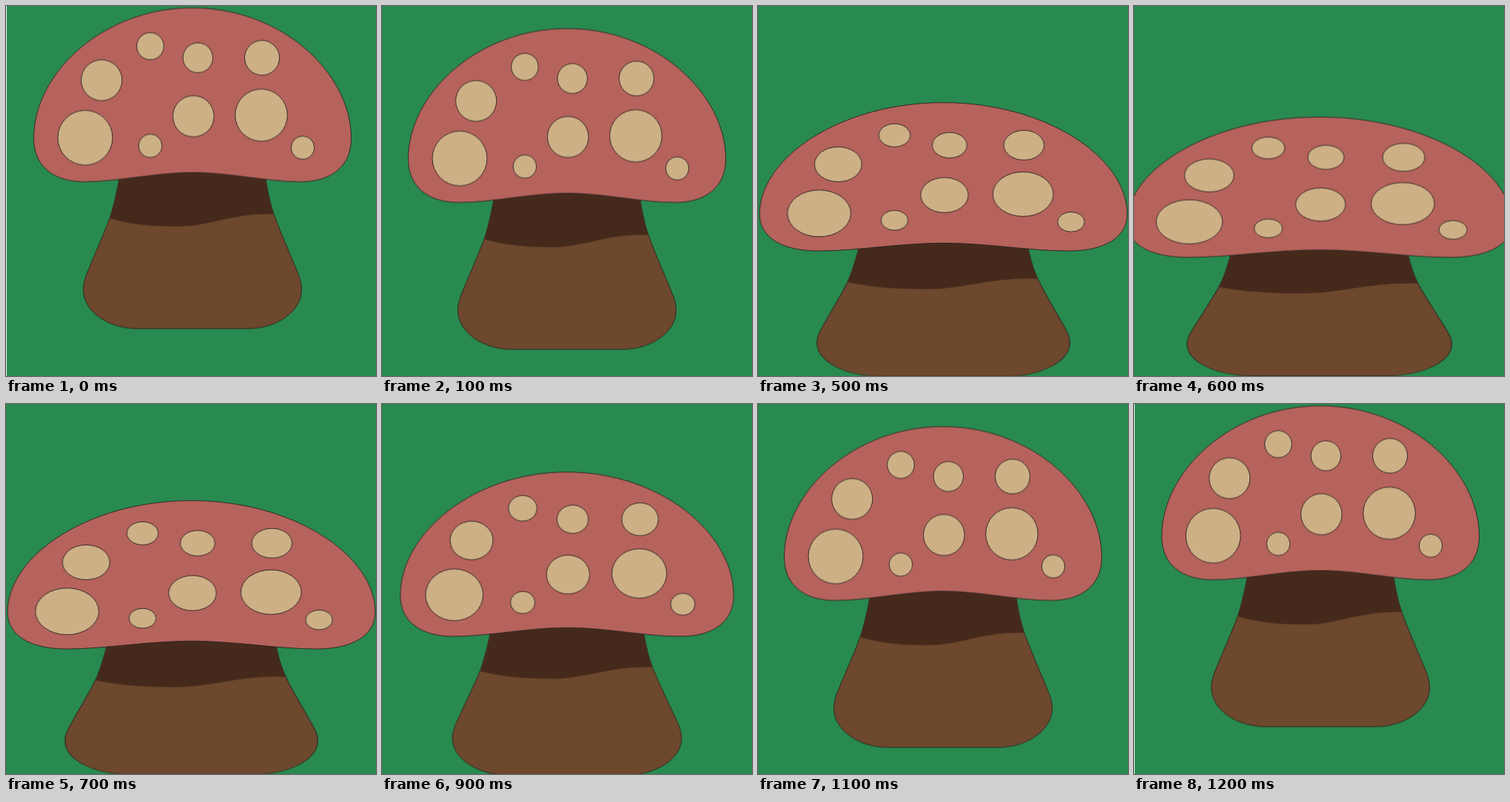
An HTML page that plays this animation: 500 px wide and 500 px high, repeating every 1.3 s.

```html
<!DOCTYPE html>
<html lang="en">
<head>
<meta charset="utf-8">
<title>Bouncing mushroom</title>
<style>
  html, body { margin: 0; width: 100%; height: 100%; overflow: hidden; background: #298a50; }
  svg { display: block; width: 100vw; height: 100vh; }
  .ink { stroke: #2b2220; stroke-width: .9; }
  .ink * { vector-effect: non-scaling-stroke; }
  .body { animation: bounce 1.3s step-end infinite; }
  .edge { animation: edge 1.3s step-end infinite; }

  /* Drop, squash against the floor, then the same way back. */
  @keyframes bounce {
    0%, 92.3%      { transform: translate(252px, 2.5px); }
    7.69%, 84.61%  { transform: translate(250px, 30.5px); }
    15.38%, 76.92% { transform: translate(250px, 64px); }
    23.07%, 69.23% { transform: translate(250px, 92px) scale(1.05, .945); }
    30.76%, 61.53% { transform: translate(250px, 111px) scale(1.104, .899); }
    38.46%, 53.84% { transform: translate(250.5px, 130.5px) scale(1.158, .853); }
    46.15%         { transform: translate(250.5px, 150px) scale(1.212, .807); }
  }
  @keyframes edge {
    0%, 92.3% { opacity: 1; }
    7.69% { opacity: 0; }
  }
</style>
</head>
<body>
<svg viewBox="0 0 500 500">
  <defs>
    <path id="stem" d="M151 250 V262 C146 288 141 307 138 315 C130 337 114 372 106 393 C103.5 400 102.5 406 102.5 411 C102.5 442 138 464 175 464
      H325 C362 464 397.5 442 397.5 411 C397.5 406 396.5 400 394 393 C386 372 370 337 361 312 C358 304 353 288 349 262 V250 Z"/>
    <clipPath id="inStem"><use href="#stem"/></clipPath>
  </defs>
  <rect class="edge" width="1" height="500" fill="#e9f3ed"/>
  <g class="body">
    <g class="ink" transform="translate(-250 -30.5)">
      <use href="#stem" fill="#6d482d"/>
      <path clip-path="url(#inStem)" stroke="none" fill="#452a1c"
        d="M100 240 H400 V310 L360 309.5 C305 307 275 326 230 326 C195 326 163 323 138 315 L100 300 Z"/>
      <path fill="#b5635c" d="M250 30.5 C370 30.5 464.5 118 464.5 207 C464.5 245 437 265.5 396 265.5
        C350 265.5 300 253 250 253 C200 253 150 265.5 104 265.5 C63 265.5 35.5 245 35.5 207 C35.5 118 130 30.5 250 30.5 Z"/>
      <g fill="#cdb086">
        <circle cx="193" cy="82.3" r="18.3"/>
        <circle cx="257.3" cy="98" r="20.2"/>
        <circle cx="344" cy="98" r="23.5"/>
        <circle cx="127.2" cy="128.3" r="27.6"/>
        <circle cx="105" cy="206" r="37"/>
        <circle cx="251.3" cy="177" r="27.8"/>
        <circle cx="343" cy="175.5" r="35.3"/>
        <circle cx="193" cy="217" r="15.8"/>
        <circle cx="399" cy="219.5" r="15.7"/>
      </g>
    </g>
  </g>
</svg>
</body>
</html>
```
